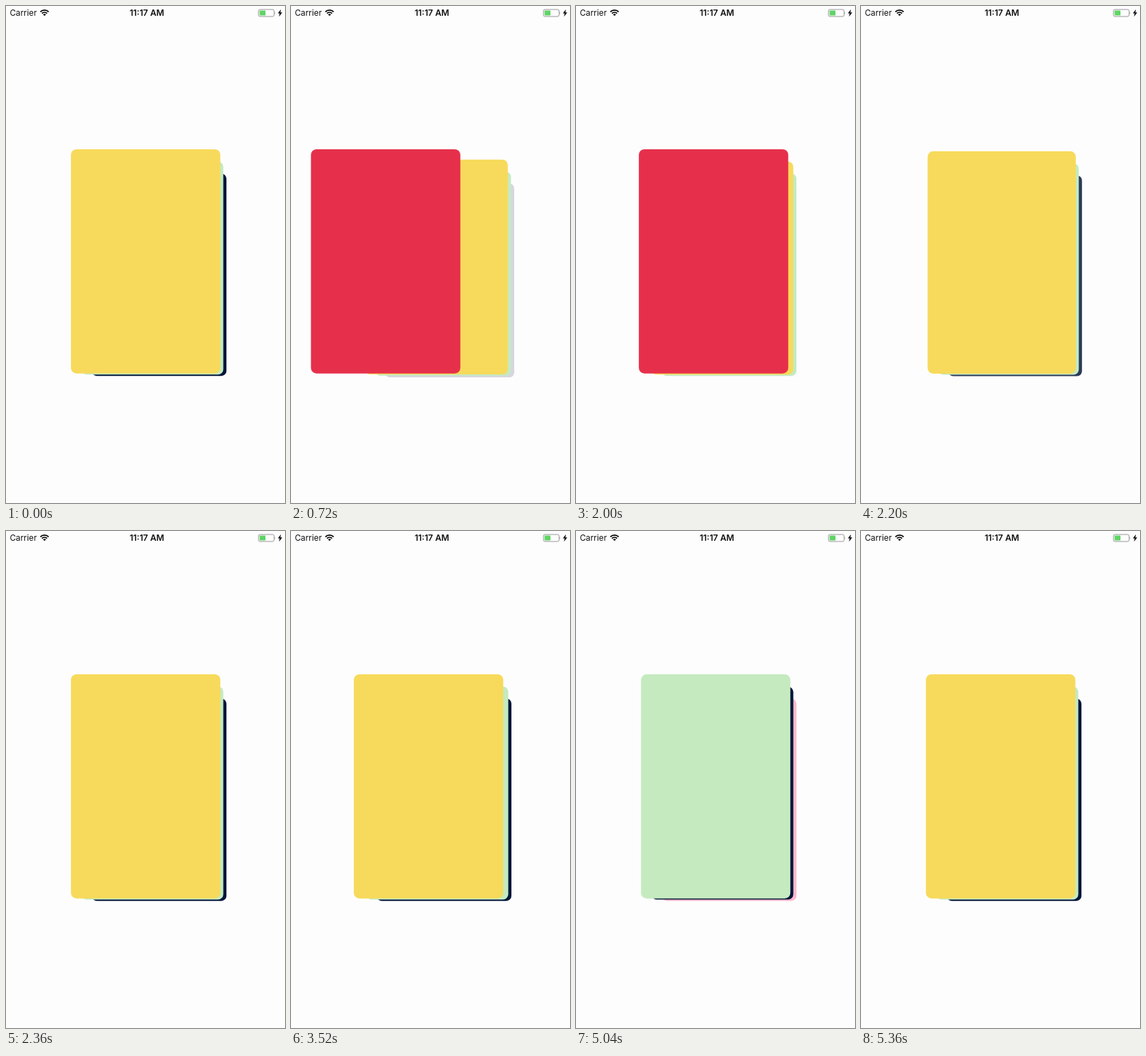
These frames come from a looping animation (400 by 711 pixels, 5.4 s). An HTML page:

```html
<!DOCTYPE html>
<html lang="en">
<head>
<meta charset="utf-8">
<title>Card stack</title>
<style>
  html, body { margin: 0; width: 100%; height: 100%; overflow: hidden; background: #fefdfe; }
  svg { display: block; width: 100%; height: 100%; }
  text { font-family: Inter, Roboto, sans-serif; fill: #111; }
</style>
</head>
<body>
<svg viewBox="0 0 400 711">
  <g id="stack"></g>
  <text x="5.5" y="14.4" font-size="11.8">Carrier</text>
  <g fill="none" stroke="#000">
    <path stroke-width="1.9" d="M49.3 8.3a8.3 8.3 0 0 1 11.8 0M51.6 10.6a5.1 5.1 0 0 1 7.2 0"/>
    <path stroke-width="2.8" d="M54.1 13.1a1.5 1.5 0 0 1 2.2 0"/>
  </g>
  <text x="202" y="14.4" font-size="12.2" font-weight="600" text-anchor="middle">11:17 AM</text>
  <rect x="362" y="5" width="22.3" height="10" rx="2" fill="none" stroke="#8b8b8d" stroke-width="0.9"/>
  <rect x="363.6" y="6.5" width="8.4" height="7" rx="0.8" fill="#5fd465"/>
  <path d="M385.4 8.2q1.6 1.8 0 3.6z" fill="#8b8b8d"/>
  <path d="M394.2 4.8l-4.4 5.8h2.6l-1 4.6 4.6-6h-2.7z" fill="#000"/>
</svg>
<script>
const LOOP = 5400, STEP = 40, STAGE_W = 400;
const CARD_W = 214.2, CARD_H = 320.7, CENTER_X = 200.2, CENTER_Y = 365.3;
const SPACING = 9.6, SHRINK = 0.95, VISIBLE = 3;
const COLORS = ['#e6304b', '#f7da5b', '#c5eabf', '#02163a', '#ffb9cc'];

// Each swipe: start time, duration, front card before and after.
const SWIPES = [
  [520, 360, 1, 0],
  [2000, 360, 0, 1],
  [3520, 320, 1, 2],
  [5040, 320, 2, 1]
];

const stack = document.getElementById('stack');
const cards = COLORS.map(color => {
  const card = document.createElementNS('http://www.w3.org/2000/svg', 'rect');
  card.setAttribute('fill', color);
  stack.prepend(card);
  return card;
});

function swipeEase(u) {
  if (u >= 1) return 1;
  return Math.max(0.0075, 1 - (1 - u ** 3) ** 9.7);
}

function frontPosition(t) {
  let pos = 1;
  for (const [start, duration, from, to] of SWIPES) {
    if (t >= start) pos = from + (to - from) * swipeEase((t - start) / duration);
  }
  return pos;
}

function setAttrs(el, attrs) {
  for (const name in attrs) el.setAttribute(name, attrs[name]);
}

function placeCard(card, depth) {
  const level = Math.max(depth, 0);
  const slide = Math.min(depth, 0) * STAGE_W;
  const scale = SHRINK ** level;
  const width = CARD_W * scale, height = CARD_H * scale;
  setAttrs(card, {
    x: CENTER_X + SPACING * level + slide - width / 2,
    y: CENTER_Y + SPACING * level - height / 2,
    width, height,
    rx: 8 * scale,
    opacity: Math.min(1, Math.max(0, VISIBLE - depth))
  });
}

function draw() {
  const t = Math.floor(performance.now() % LOOP / STEP) * STEP;
  const pos = frontPosition(t);
  cards.forEach((card, i) => placeCard(card, i - pos));
  requestAnimationFrame(draw);
}
draw();
</script>
</body>
</html>
```
